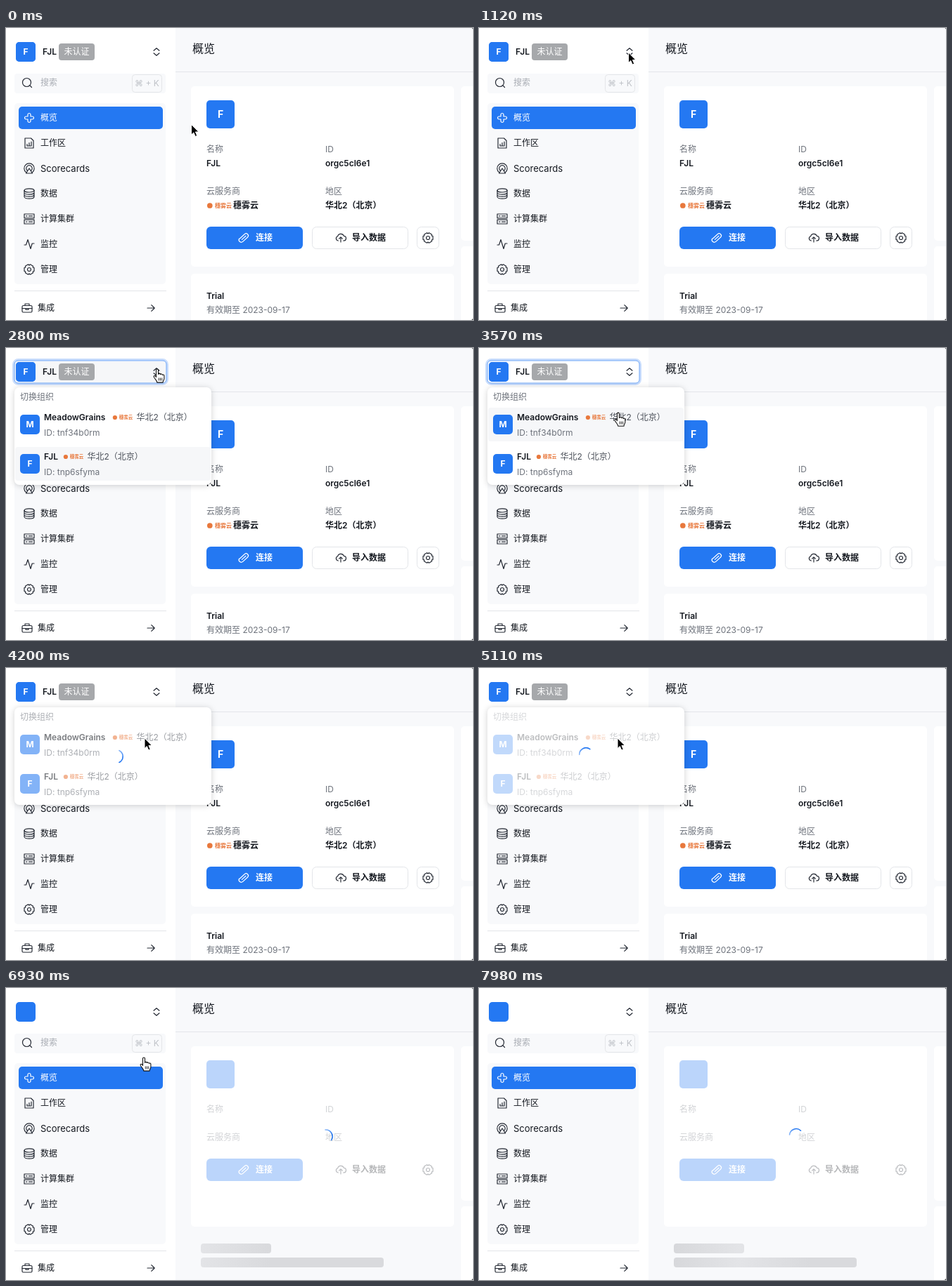
An HTML page that plays this animation: 664 px wide and 416 px high, repeating every 8000 ms.

```html
<!DOCTYPE html>
<html lang="zh-CN">
<head>
<meta charset="utf-8">
<title>Overview</title>
<style>
  html, body { margin: 0; width: 100%; height: 100%; overflow: hidden; background: #fff; }
  svg { display: block; width: 664px; height: 416px; }
  text { font-family: Inter, "Noto Sans CJK SC", "Noto Sans CJK", sans-serif; font-size: 12px; fill: #14181f; }
  .icon { fill: none; stroke: #252a34; stroke-width: 1.2; stroke-linecap: round; stroke-linejoin: round; }
  .light { stroke: #fff; }
  .pop { filter: drop-shadow(0 1px 4px #0000002e); }
</style>
</head>
<body>
<svg id="stage" viewBox="0 0 664 416">
  <defs>
    <linearGradient id="bar"><stop stop-color="#5cc6f6"/><stop offset=".5" stop-color="#2f8df6"/><stop offset="1" stop-color="#1f6ff0"/></linearGradient>
    <linearGradient id="tail" x1="0" y1="0" x2="0" y2="1"><stop stop-color="#2478f2" stop-opacity=".55"/><stop offset=".6" stop-color="#2478f2"/></linearGradient>
    <linearGradient id="shimmer" gradientUnits="userSpaceOnUse" x1="270" x2="470" y1="0" y2="0">
      <stop stop-color="#d6d7da"/><stop offset=".5" stop-color="#e3e4e7"/><stop offset="1" stop-color="#d9dadd"/>
    </linearGradient>
  </defs>
</svg>
<script>
const LOOP = 8000, STEP = 70;
const BLUE = '#2478f2', PALE = '#f8f9fb', GREY = '#6d727b', ORANGE = '#e8783c';
const ORG = 'FJL', OTHER = 'MeadowGrains', CLOUD = '穗雾云', REGION = '华北2（北京）';

// y is the vertical middle of the line
const text = (x, y, s, { size = 12, weight = 400, fill = '#14181f', anchor = 'start' } = {}) =>
  `<text x="${x}" y="${y + size * .36}" text-anchor="${anchor}" style="font-size:${size}px;font-weight:${weight};fill:${fill}">${s}</text>`;
const rect = (x, y, w, h, fill, r = 0, more = '') =>
  `<rect x="${x}" y="${y}" width="${w}" height="${h}" rx="${r}" fill="${fill}" ${more}/>`;
const group = (id, body, more = '') => `<g id="${id}" ${more}>${body}</g>`;
const tile = (x, y, size, letter, r = 5) =>
  rect(x, y, size, size, BLUE, r) +
  text(x + size / 2, y + size / 2, letter, { size: size > 30 ? 14 : 12, weight: 700, fill: '#fff', anchor: 'middle' });

const gear = Array.from({ length: 6 }, (_, i) => {
  const at = (r, d) => {
    const a = (i * 60 + d) * Math.PI / 180;
    return `${(r * Math.cos(a)).toFixed(2)} ${(r * Math.sin(a)).toFixed(2)}`;
  };
  return `${i ? 'L' : 'M'}${at(7.4, -19)}L${at(7.4, 19)}L${at(6, 30)}`;
}).join('') + 'Z';

const ICONS = {
  search: '<circle r="6"/><path d="M4.4 4.4L7 7"/>',
  overview: '<path d="M-2 -2V-4.5A2 2 0 0 1 2 -4.5V-2H4.5A2 2 0 0 1 4.5 2H2V4.5A2 2 0 0 1 -2 4.5V2H-4.5A2 2 0 0 1 -4.5 -2Z"/>',
  sheet: '<path d="M-6 -7H2.5L6 -3.5V7H-6ZM-3 4V1.5M0 4V-.5M3 4V-2M-3 4H3"/>',
  gauge: '<path d="M-4.5 5.6A7.2 7.2 0 1 1 4.5 5.6M-2.6 3.2A4.2 4.2 0 1 1 2.6 3.2M-4.5 7L0 0L4.5 7Z"/>',
  data: '<ellipse cy="-4.6" rx="7" ry="2.6"/><path d="M-7 -4.6V4.6A7 2.6 0 0 0 7 4.6V-4.6M-7 -1.5A7 2.6 0 0 0 7 -1.5M-7 1.6A7 2.6 0 0 0 7 1.6"/>',
  server: '<path d="M-7 -7H7V-1.2H-7ZM-7 1.2H7V7H-7ZM-4.4 -4.1H-3M-.5 -4.1H4.5M-4.4 4.1H-3M-.5 4.1H4.5"/>',
  pulse: '<path d="M-7 1H-4.5L-2 -6.5L2 6.5L4.2 -1H7"/>',
  gear: `<path d="${gear}"/><circle r="2.5"/>`,
  case: '<rect x="-7" y="-3.5" width="14" height="9.5" rx="1.5"/><path d="M-3 -3.5V-6H3V-3.5M-7 .5H7M-2 .5V2.2H2V.5"/>',
  arrow: '<path d="M-5 0H5M.8 -4.4L5.2 0L.8 4.4"/>',
  chevrons: '<path d="M-4 -1.8L0 -5.2L4 -1.8M-4 1.8L0 5.2L4 1.8"/>',
  clip: '<path d="M-5.5 1L1.2 -5.2A3 3 0 0 1 5.6 -1L-1.6 5.6A3.4 3.4 0 0 1 -6.5 1.2M-2.6 2.4L3 -2.8"/>',
  upload: '<path d="M-3.5 4H-4A3.2 3.2 0 0 1 -4.4 -2.2A4.6 4.6 0 0 1 4.4 -2.6A3.3 3.3 0 0 1 4 4H3.5M0 6V-1M-2.4 1.2L0 -1.2L2.4 1.2"/>',
};
const icon = (name, x, y, more = '') => `<g class="icon ${more}" transform="translate(${x} ${y})">${ICONS[name]}</g>`;

const vendor = (x, y, size) =>
  `<circle cx="${x + size * .6}" cy="${y}" r="${size * .48}" fill="${ORANGE}"/>` +
  text(x + size * 1.5, y, CLOUD, { size, weight: 700, fill: ORANGE });

const NAV = [['overview', '概览'], ['sheet', '工作区'], ['gauge', 'Scorecards'], ['data', '数据'],
  ['server', '计算集群'], ['pulse', '监控'], ['gear', '管理']];

const sidebar =
  rect(0, 0, 241, 416, '#fff') +
  group('hover', rect(12, 19, 216, 31, '#f6f7f9', 5)) +
  group('focus', rect(10.5, 16.5, 219, 35, 'none', 7, 'stroke="#c9ddfc" stroke-width="3"') +
    rect(12, 18, 216, 32, 'none', 5, 'stroke="#6ea6f7"')) +
  rect(14, 20, 28, 28, BLUE, 5) +
  group('org', tile(14, 20, 28, ORG[0]) + text(52, 34, ORG, { weight: 600 }) +
    rect(75, 22, 51, 24, '#a6a8ab', 4) + text(100.5, 34, '未认证', { fill: '#fff', anchor: 'middle' })) +
  icon('chevrons', 214, 34) +
  rect(12, 65, 215, 28, PALE, 4) + icon('search', 29.5, 77.5) +
  text(49, 78, '搜索', { fill: '#a9adb4' }) +
  rect(179.5, 66.5, 42, 25, PALE, 4, 'stroke="#e4e6e9"') +
  text(200.5, 79, '⌘ + K', { fill: '#bfc2c8', anchor: 'middle' }) +
  rect(12, 107, 215, 258, PALE, 5) + rect(18, 112, 205, 32, BLUE, 5) +
  NAV.map(([name, label], i) => {
    const y = 128 + i * 36, on = i === 0;
    return icon(name, 33, y, on ? 'light' : '') +
      text(49, y, label, { size: i === 2 ? 13 : 12, weight: on ? 500 : 400, fill: on ? '#fff' : '#14181f' });
  }).join('') +
  rect(12, 374, 216, 1, '#e3e5e9') + icon('case', 30, 399) + text(45, 399, '集成') + icon('arrow', 206, 399);

const buttons = (y, framed) => {
  const edge = 'stroke="#e3e5e9"';
  return rect(285, y, 137, 32, BLUE, 6) + icon('clip', 338, y + 16, 'light') +
    text(355, y + 16, '连接', { weight: 600, fill: '#fff' }) +
    (framed ? rect(435.5, y + .5, 136, 31, '#fff', 6, edge) + rect(584.5, y + .5, 31, 31, '#fff', 6, edge) : '') +
    icon('upload', 476, y + 16) + text(492, y + 16, '导入数据', { weight: 600 }) + icon('gear', 600, y + 16);
};
const label = (x, y, s) => text(x, y, s, { fill: GREY });
const value = (x, y, s) => text(x, y, s, { weight: 600 });

const ready = tile(285, 103, 40, ORG[0]) +
  label(285, 173, '名称') + label(454, 173, 'ID') + value(285, 193, ORG) + value(454, 193, 'orgc5cl6e1') +
  label(285, 233, '云服务商') + label(454, 233, '地区') + vendor(285, 253, 8) + value(323, 253, CLOUD) + value(454, 253, REGION) +
  buttons(283, true) +
  rect(263, 350, 374, 80, '#fff', 5) + value(285, 382, 'Trial') + label(285, 402, '有效期至 2023-09-17');

const loading = group('dim', rect(285, 103, 40, 40, BLUE, 5) +
    label(285, 173, '名称') + label(454, 173, 'ID') + label(285, 213, '云服务商') + label(454, 213, '地区') + buttons(243, false)) +
  rect(277, 364, 100, 14, 'url(#shimmer)', 4) + rect(277, 384, 260, 14, 'url(#shimmer)', 4);

const page = rect(241, 62, 423, 1, '#e3e5ea') + text(265, 29.5, '概览', { size: 16, weight: 500 }) +
  rect(263, 83, 374, 257, '#fff', 5) + rect(647, 83, 30, 220, '#fff', 5) + rect(647, 311, 30, 120, '#fff', 5) +
  group('ready', ready) + group('loading', loading);

const choice = (y, name, id, logoX) =>
  tile(20, y - 4, 28, name[0]) + text(54, y, name, { weight: 600 }) +
  vendor(logoX, y, 6.5) + text(logoX + 34.5, y, REGION, { fill: '#4a4f58' }) +
  text(54, y + 22, `ID: ${id}`, { fill: GREY });
const popup = rect(12, 56, 280, 139, '#fff', 7, 'class="pop"') +
  group('choices', rect(13, 141, 278, 48, '#f6f7f9', 4, 'id="row"') + label(20, 69.5, '切换组织') +
    choice(99, OTHER, 'tnf34b0rm', 151) + choice(155, ORG, 'tnp6sfyma', 81));

const arc = '<path d="M7.3 -8.5A9.5 9.5 0 0 1 7.3 8.5" fill="none" stroke="url(#tail)" stroke-width="1.6" stroke-linecap="round"/>';
const hand = '<path d="M-3 0C-3 -2 0 -2 0 0V6C.2 4.4 2.8 4.6 3 6.2C3.4 5 5.6 5.2 5.8 7C6.4 6 8.4 6.4 8.4 8.2V12C8.4 14 6.6 15 6.6 17.6H-1.6C-1.8 15 -5 12.6 -6.3 9.6C-6.8 8 -4.6 7.2 -3.6 9L-3 10Z" fill="#fff" stroke="#111" stroke-width="1.1" stroke-linejoin="round"/><path d="M.8 11V15M3 11V15M5.2 11V15" stroke="#111" stroke-width=".9"/>';

const stage = document.getElementById('stage');
stage.insertAdjacentHTML('beforeend',
  group('view', rect(0, 0, 664, 416, PALE) + group('page', page) + rect(241, 0, 423, 2, 'url(#bar)', 0, 'id="progress"') + sidebar) +
  group('popup', popup) +
  group('blank', rect(0, 0, 664, 416, '#fff') + rect(0, 0, 664, 2, 'url(#bar)', 0, 'id="boot"')) +
  group('spin', arc) +
  '<circle id="ring" fill="#fff" fill-opacity=".65" stroke="#111" stroke-width="1.4"/>' +
  group('cursor', group('pointer', '<path d="M0 0V14.6L3.3 11.5L5.7 17L8.2 15.9L5.9 10.5H10.4Z" fill="#000" stroke="#fff" stroke-width="1"/>') +
    group('hand', hand, 'transform="translate(.5 .5)"')) +
  '<path d="M664 413V416H661Q664 416 664 413ZM664 2V0H662Q664 0 664 2Z" fill="#222"/>');

const el = Object.fromEntries([...stage.querySelectorAll('[id]')].map(n => [n.id, n]));
const show = (name, on) => { el[name].style.display = on ? '' : 'none'; };
const fade = (name, v) => { el[name].style.opacity = v; };
const within = (t, a, b) => t >= a && t < b;

// rows are [time, ...values], linear in between
function track(rows, t) {
  const next = rows.findIndex(row => row[0] > t);
  if (next < 0) return rows[rows.length - 1].slice(1);
  if (next === 0) return rows[0].slice(1);
  const a = rows[next - 1], b = rows[next], k = (t - a[0]) / (b[0] - a[0]);
  return a.slice(1).map((v, i) => v + (b[i + 1] - v) * k);
}

const PATH = [[0, 263.5, 137.5], [280, 226, 48], [490, 226, 48], [700, 212.5, 35], [1470, 212.5, 35],
  [1750, 216, 31], [2940, 216, 31], [3640, 197, 100]];
// start, end, ring centre and radius
const CLICKS = [[980, 1120, 212.5, 34.5, 21.5], [2380, 2520, 215, 32, 30.5], [3990, 4130, 197, 100, 30.5]];

function draw(t) {
  const [x, y] = track(PATH, t);
  const booted = t >= 5950, loaded = t >= 6230;

  el.cursor.setAttribute('transform', `translate(${x} ${y})`);
  show('cursor', t < 7140);
  const pointing = within(t, 1540, 4130) || booted;
  show('hand', pointing);
  show('pointer', !pointing);

  const click = CLICKS.find(([a, b]) => within(t, a, b));
  show('ring', click);
  if (click) ['cx', 'cy', 'r'].forEach((key, i) => el.ring.setAttribute(key, click[i + 2]));

  fade('hover', track([[1470, 0], [1750, 1], [3080, 1], [3360, 0]], t)[0]);
  show('focus', within(t, 2450, 3990));
  show('org', t < 5530);

  show('popup', within(t, 2660, 5530));
  fade('popup', track([[2590, 0], [2730, 1]], t)[0]);
  fade('choices', track([[4060, 1], [4200, .56], [4480, .32], [4900, .28]], t)[0]);
  el.row.setAttribute('y', t < 3430 ? 141 : 85);
  show('row', t < 4130);

  show('blank', within(t, 5530, 5950));
  show('boot', t >= 5600);
  show('progress', booted && !loaded);
  show('page', t < 5530 || loaded);
  show('ready', t < 5530);
  show('loading', loaded);
  fade('dim', track([[6230, 1], [6650, .31]], t)[0]);
  const slide = track([[6230, -200], [7560, 0]], t)[0];
  document.getElementById('shimmer').setAttribute('gradientTransform', `translate(${slide} 0)`);

  const early = within(t, 4130, 5530);
  show('spin', early || t >= 6300);
  const angle = early ? 243 + .267 * (t - 5110) : 250 + .267 * (t - 7980);
  el.spin.setAttribute('transform', `translate(${early ? '153.6 126' : '452 213'}) rotate(${angle})`);
}

const start = performance.now();
function tick() {
  const t = (performance.now() - start) % LOOP;
  draw(Math.floor(t / STEP) * STEP);
  requestAnimationFrame(tick);
}
draw(0);
tick();
</script>
</body>
</html>
```
